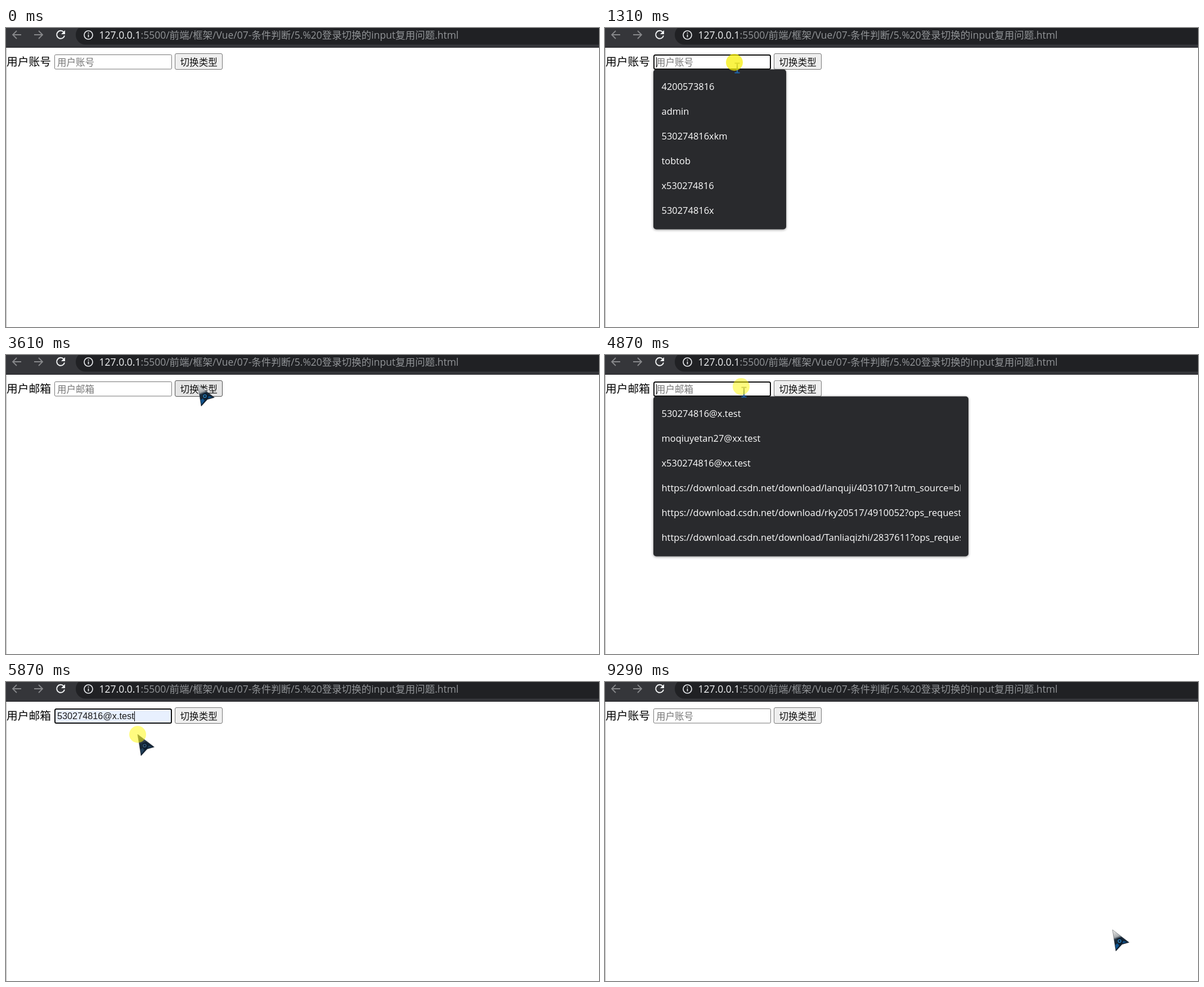
Animation of 1054x531 px, one loop 9.69 s. Source, as an HTML page with a canvas:

```html
<!DOCTYPE html>
<html lang="zh-CN">
<head>
<meta charset="utf-8">
<title>登录切换</title>
<style>
html, body { margin: 0; width: 100%; height: 100%; overflow: hidden; background: #fff; }
canvas { display: block; }
</style>
</head>
<body>
<canvas id="stage" width="1054" height="531"></canvas>
<script>
const g = document.getElementById('stage').getContext('2d');
const LOOP = 9690, STEP = 70;
const UI = '"Open Sans", "Noto Sans CJK SC", "Noto Sans CJK", sans-serif';
const CJK = '"Noto Sans CJK SC", "Noto Sans CJK", sans-serif';
const FIELD = '"Liberation Sans", "Noto Sans CJK SC", sans-serif';

const accounts = ['4200573816', 'admin', '530274816xkm', 'tobtob', 'x530274816', '530274816x'];
const emails = [
  '530274816@x.test', 'moqiuyetan27@xx.test', 'x530274816@xx.test',
  'https://download.csdn.net/download/lanquji/4031071?utm_source=bbsseo',
  'https://download.csdn.net/download/rky20517/4910052?ops_request_misc',
  'https://download.csdn.net/download/Tanliaqizhi/2837611?ops_request_misc'
];

// Each glide continues from where the last one ended
const entry = { x: 1172, y: 635 };
const glides = [
  { at: 130, steps: 6, x: 253, y: 125 },
  { at: 740, steps: 6, x: 230, y: 61 },
  { at: 1770, steps: 5, x: 205, y: 101 },
  { at: 2720, steps: 7, x: 341, y: 53 },
  { at: 4470, steps: 3, x: 242, y: 56 },
  { at: 5200, steps: 4, x: 234, y: 93 },
  { at: 6080, steps: 6, x: 335, y: 60 },
  { at: 7420, steps: 1, x: 332, y: 108 },
  { at: 7490, steps: 1, x: 331, y: 117 },
  { at: 8690, steps: 3, x: 915, y: 482 },
  { at: 9090, steps: 3, x: 902, y: 440 }
];

const within = (t, a, b) => t >= a && t < b;
const inBox = (p, x, y, w, h) => p && within(p.x, x, x + w) && within(p.y, y, y + h);
const easeOut = (u, power) => 1 - (1 - u) ** power;
const mix = (a, b, u) => a + (b - a) * u;

function pointerAt(t) {
  if (t < glides[0].at) return null;
  let pos = entry;
  for (const m of glides) {
    if (t < m.at) break;
    const u = Math.min(1, (Math.floor((t - m.at) / STEP) + 1) / m.steps);
    pos = { x: mix(pos.x, m.x, easeOut(u, 2)), y: mix(pos.y, m.y, easeOut(u, 1.5)) };
  }
  return pos;
}

function clickAt(t) {
  return within(t, 1310, 1510) || within(t, 2320, 2520) || within(t, 3340, 3610) ||
    within(t, 4800, 5070) || within(t, 5670, 5940) || within(t, 6690, 6960) || within(t, 7690, 7960);
}

function stateAt(t) {
  const pos = pointerAt(t);
  const click = clickAt(t);
  const mail = within(t, 3610, 6890);
  const open = within(t, 1310, 2450) || within(t, 4870, 5870);
  const rows = mail ? emails : accounts;
  const listWidth = mail ? 560 : 236;
  const row = open && inBox(pos, 86, 82, listWidth, 264) ? Math.floor((pos.y - 82) / 44) : -1;
  const filled = within(t, 2450, 3610) || within(t, 5870, 6890);
  const overButton = inBox(pos, 300, 45, 85, 29);
  return {
    t, pos, open, rows, listWidth, row, click, overButton,
    label: mail ? '用户邮箱' : '用户账号',
    focus: within(t, 1310, 3340) || within(t, 4800, 6690),
    value: filled ? rows[0] : '',
    preview: row >= 0 ? rows[row] : '',
    caretFrom: [5870, 4800, 2450, 1310].find(c => t >= c),
    overField: inBox(pos, 86, 47, 209, 27),
    pressed: overButton && click
  };
}

function text(s, x, y, size, color, family) {
  g.font = size + 'px ' + family;
  g.fillStyle = color;
  g.fillText(s, x, y);
  return x + g.measureText(s).width;
}

function rect(x, y, w, h, fill) {
  g.fillStyle = fill;
  g.fillRect(x, y, w, h);
}

function box(x, y, w, h, r, fill, stroke, line = 1) {
  g.beginPath();
  g.roundRect(x, y, w, h, r);
  g.fillStyle = fill;
  g.fill();
  if (!stroke) return;
  g.strokeStyle = stroke;
  g.lineWidth = line;
  g.stroke();
}

function disc(x, y, r, fill) {
  g.beginPath();
  g.arc(x, y, r, 0, 7);
  g.fillStyle = fill;
  g.fill();
}

function fillPath(d, color) {
  g.fillStyle = color;
  g.fill(new Path2D(d));
}

function strokePath(d, color, width) {
  g.strokeStyle = color;
  g.lineWidth = width;
  g.stroke(new Path2D(d));
}

function drawBar() {
  rect(0, 0, 1054, 35, '#35363a');
  rect(0, 34, 1054, 1, '#1f2023');
  box(124, -5, 960, 34.5, 17, '#202124');
  strokePath('M27 12H12M19 5L12 12L19 19', '#87888b', 1.8);
  strokePath('M50 12H65M58 5L65 12L58 19', '#87888b', 1.8);
  strokePath('M102.5 7.2A7 7 0 1 0 104 13.5', '#f1f3f4', 2);
  fillPath('M105 4V11H98Z', '#f1f3f4');
  strokePath('M154 12.5A7.5 7.5 0 1 0 139 12.5A7.5 7.5 0 1 0 154 12.5M146.5 11.5V16.5M146.5 8V9.8', '#e8eaed', 1.7);
  const x = text('127.0.0.1', 165.5, 19, 17.5, '#f1f3f4', UI);
  text(':5500/前端/框架/Vue/07-条件判断/5.%20登录切换的input复用问题.html', x, 19, 17.5, '#929598', UI);
  rect(0, 35, 1, 496, '#b4b4b4');
}

function drawField(s) {
  const fill = s.value || s.preview ? '#e8f0fe' : '#fff';
  if (s.focus) box(87, 48, 207, 25, 2.5, fill, '#101010', 2);
  else box(86.5, 47.5, 208, 25.5, 2, fill, s.overField ? '#4f4f4f' : '#767676');
  let end = 91;
  if (s.value) end = text(s.value, 91, 66, 16.25, '#1a1a1a', FIELD);
  else if (s.preview) text(s.preview, 91, 66, 16.25, '#1a1a1a', UI);
  else text(s.label, 91, 66.5, 16.5, '#757575', CJK);
  const lit = (s.t - s.caretFrom) % 1060 < 530;
  if (s.focus && !s.preview && lit) rect(Math.round(end), 52, 1, 18, '#000');
}

function drawButton(s) {
  const fill = s.pressed ? '#f5f5f5' : s.overButton ? '#e5e5e5' : '#efefef';
  box(300.5, 45.5, 84, 28, 2.5, fill, s.overButton ? '#4f4f4f' : '#767676');
  text('切换类型', 309.5, 66.5, 16.6, '#111', CJK);
}

function drawList(s) {
  g.save();
  g.shadowColor = 'rgba(0,0,0,.45)';
  g.shadowBlur = 4;
  g.shadowOffsetY = 1;
  box(86, 73.5, s.listWidth, 284, 5, '#292a2d');
  g.restore();
  if (s.row >= 0) rect(86, 82 + 44 * s.row, s.listWidth, 44, '#3f4043');
  g.save();
  g.beginPath();
  g.rect(86, 73, s.listWidth - 14, 285);
  g.clip();
  s.rows.forEach((r, i) => text(r, 100.5, 110 + 44 * i, 16.45, '#fff', UI));
  g.restore();
}

function drawArrow(dim) {
  const body = g.createLinearGradient(3, 0, 15, 32);
  body.addColorStop(0, dim ? '#59636c' : '#f0f0ee');
  body.addColorStop(0.38, dim ? '#3b4650' : '#a9adb0');
  body.addColorStop(0.5, '#1c2c3b');
  body.addColorStop(1, '#0a1a2b');
  fillPath('M0 0L29.5 22.5L17 26L6 38Z', body);
  fillPath('M8 16L15 14L21 21L14 26Z', '#0d1f33');
  fillPath('M5 27L9 24L12 28L6.5 35ZM19 20L26 22L18 24Z', dim ? '#22405a' : '#10548f');
  strokePath('M15 20A2.5 2.5 0 1 0 10 20A2.5 2.5 0 1 0 15 20', dim ? '#3f6484' : '#2b8fd0', 1.2);
  strokePath('M0 0L29.5 22.5L17 26L6 38Z', 'rgba(45,52,60,.6)', 0.8);
}

function drawBeam() {
  const tone = g.createLinearGradient(0, 0, 0, 19);
  tone.addColorStop(0, '#b9b4a4');
  tone.addColorStop(0.45, '#56728c');
  tone.addColorStop(1, '#1763ae');
  strokePath('M0.5 1.5H9.5M5 1.5V18.5M0.5 18.5H9.5', tone, 2.2);
}

function drawPointer(s) {
  g.save();
  g.translate(s.pos.x, s.pos.y);
  if (s.overField) drawBeam();
  else drawArrow(within(s.t, 5670, 6080));
  if (s.click) disc(0, 0, 15, s.t < 1510 ? 'rgba(246,238,0,.72)' : 'rgba(255,250,0,.5)');
  g.restore();
}

function draw(t) {
  const s = stateAt(t);
  rect(0, 0, 1054, 531, '#fff');
  drawBar();
  text(s.label, 1, 67, 19.8, '#000', CJK);
  drawField(s);
  drawButton(s);
  if (s.open) drawList(s);
  if (s.pos) drawPointer(s);
}

const began = performance.now();
function tick() {
  draw((performance.now() - began) % LOOP);
  requestAnimationFrame(tick);
}
tick();
</script>
</body>
</html>
```
